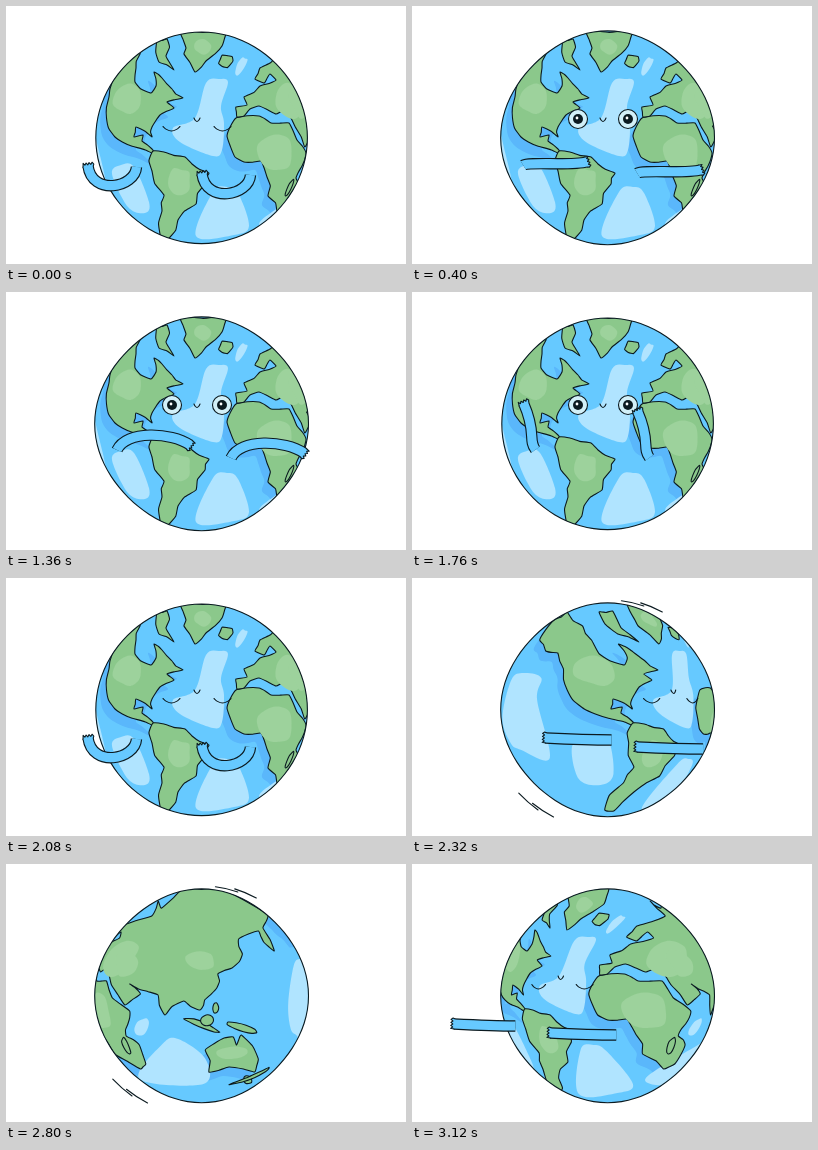
Write an HTML page with a canvas that moves like this. It is 400 px wide and 258 px high and loops after 3.2 s.

```html
<!DOCTYPE html>
<html lang="en">
<head>
<meta charset="utf-8">
<title>Dancing globe</title>
<style>
html, body { margin: 0; width: 100%; height: 100%; overflow: hidden; background: #fff; }
canvas { display: block; width: 400px; height: 258px; }
</style>
</head>
<body>
<canvas id="stage"></canvas>
<script>
const STEP = 80, FRAMES = 40, BEAT = 13, SPIN = 27;
const CX = 196, CY = 132, R = 110, TURN = 280, DEG = Math.PI / 180;
const INK = '#0b1a20', SEA = '#66c9ff', DEEP = '#5ab7fb', FOAM = '#b0e4ff',
      LAND = '#8bc88b', MEADOW = '#9dd29c';

const canvas = document.getElementById('stage');
const dpr = window.devicePixelRatio || 1;
canvas.width = 400 * dpr;
canvas.height = 258 * dpr;
const g = canvas.getContext('2d');

let seed = 7;
const random = () => (seed = (seed * 16807) % 2147483647) / 2147483647;

// Key points are given as seen with the globe turned to one of these views:
// Atlantic, Pacific, Pacific from its far side, South Asia, Africa.
const VIEW = { A: 0, P: 77, Q: -203, S: -112, F: -26 };
const ring = y => R * Math.sqrt(Math.max(0.3, 1 - ((y - CY) / R) ** 2));

function toGlobe(view, x, y) {
  const s = Math.max(-1, Math.min(1, (x - CX) / ring(y)));
  return [Math.asin(s) / DEG - VIEW[view], y];
}

function read(text) {
  let view;
  const out = [];
  for (const word of text.trim().split(/\s+/)) {
    if (word in VIEW) view = word;
    else out.push(toGlobe(view, ...word.split(',').map(Number)));
  }
  return out;
}

// Break long stretches of coast with a small random bend.
function roughen(pts) {
  return pts.flatMap((p, i) => {
    const q = pts[(i + 1) % pts.length], dx = q[0] - p[0], dy = q[1] - p[1];
    if (Math.hypot(dx, dy) < 9) return [p];
    const bend = (random() - 0.5) * 0.2;
    return [p, [(p[0] + q[0]) / 2 - dy * bend, (p[1] + q[1]) / 2 + dx * bend]];
  });
}

function blob(view, x, y, rx, ry, tilt = 0) {
  return Array.from({ length: 9 }, (_, i) => {
    const a = i * 40 * DEG, r = 0.85 + 0.3 * random(), t = tilt * DEG;
    const u = rx * r * Math.cos(a), v = ry * r * Math.sin(a);
    return toGlobe(view, x + u * Math.cos(t) - v * Math.sin(t), y + u * Math.sin(t) + v * Math.cos(t));
  });
}

const foam = [
  read('A 200,77 213,73 222,76 215,100 218,117 216,144 207,150 174,136 167,122 189,112'),
  read('A 207,186 221,181 232,187 243,220 228,229 190,230'),
  read('A 106,168 115,159 128,161 143,196 139,207 122,201'),
  read('P 145,102 165,95 192,100 190,122 198,180 160,172 142,165 130,140'),
  read('S 160,180 176,175 203,195 200,220 135,215'),
  blob('A', 235, 60, 10, 4, -62), blob('S', 139, 163, 10, 6, -60)];

const coasts = [
  // North America
  `A 134,48 130,62 129,76 145,87 150,80 148,66 156,72 166,83 177,92 161,96 168,102 154,109 146,121
   146,131 130,121 128,131 137,129 136,135 146,143
   P 283,150 262,140 242,131 224,112 216,91 204,75 188,73 172,62 173,42 190,34`,
  // Africa
  `A 230,112 253,110 265,117 283,117 291,134 300,147 296,160 290,172 291,181 279,200 271,205
   262,190 261,171 255,155 238,156 229,151 221,130`,
  // Australia
  'S 203,186 222,174 231,173 234,181 239,171 255,195 251,208 226,203 206,208',
  // Europe and Asia
  `A 231,111 230,101 241,99 238,91 254,80 270,74 264,68 258,77 249,73 254,62 268,52 F 236,37 247,44
   S 180,24 215,24 Q 164,50 136,64 128,87 124,78 S 255,67 236,75 240,90 230,104 216,110 215,124
   203,136 198,146 182,137 163,151 156,131 136,125 127,120 138,130 122,141 108,121
   A 286,114 282,104 270,108 262,104 253,100 244,103 238,110`,
  // South America
  `A 147,145 158,146 179,151 186,158 203,167 199,178 190,198 172,214 162,233 155,232 156,205
   158,189 146,165`,
  // Greenland, Baffin
  'A 174,24 180,42 178,48 189,66 200,55 216,40 220,24',
  'A 151,34 161,33 160,50 168,64 153,56'
].map(text => roughen(read(text)));
const shaded = coasts.slice(0, 3);

const islands = [
  blob('A', 220, 55, 7, 6), blob('F', 255, 182, 3.5, 9, 20), blob('S', 200, 161, 18, 3, 22),
  blob('S', 205, 156, 6, 5), blob('S', 214, 144, 3, 5), blob('S', 240, 164, 14, 3.5, 18),
  blob('S', 244, 216, 4, 4), blob('Q', 143, 212, 3, 10, 35)];

const meadows = [
  blob('A', 122, 93, 15, 15), blob('A', 174, 175, 11, 13), blob('A', 196, 40, 9, 8),
  blob('A', 268, 147, 17, 19), blob('F', 250, 95, 22, 17), blob('S', 198, 96, 15, 10),
  blob('S', 123, 98, 12, 14), blob('S', 230, 189, 15, 6)];

// Smooth line through the points; a larger ease gives a softer curve.
function trace(pts, closed, ease = 0.167) {
  const n = pts.length;
  const at = i => closed ? pts[(i + n) % n] : pts[Math.max(0, Math.min(n - 1, i))];
  g.beginPath();
  g.moveTo(...pts[0]);
  for (let i = 0; i < (closed ? n : n - 1); i++) {
    const [a, b, c, d] = [at(i - 1), at(i), at(i + 1), at(i + 2)];
    g.bezierCurveTo(b[0] + (c[0] - a[0]) * ease, b[1] + (c[1] - a[1]) * ease,
      c[0] - (d[0] - b[0]) * ease, c[1] - (d[1] - b[1]) * ease, ...c);
  }
  if (closed) g.closePath();
}

function project(pts, turn) {
  for (const k of [-TURN, 0, TURN]) {
    const at = pts.map(([lon, y]) => [lon + turn + k, y]);
    if (at.every(p => Math.abs(p[0]) >= 90)) continue;
    return at.map(([lon, y]) => [CX + ring(y) *
      (Math.abs(lon) < 90 ? Math.sin(lon * DEG) : 1.1 * Math.sign(lon)), y]);
  }
  return null;
}

function paint(list, turn, fill, inked) {
  g.fillStyle = fill;
  for (const pts of list) {
    const p = project(pts, turn);
    if (!p) continue;
    trace(p, true, inked ? 0.08 : 0.167);
    g.fill();
    if (inked) g.stroke();
  }
}

function rim(n) {
  const wobble = n % 2 ? 1.5 : 0.4;
  return Array.from({ length: 48 }, (_, i) => {
    const a = i * 7.5 * DEG, r = 105.4 + wobble * Math.cos(4 * a);
    return [195.6 + r * Math.cos(a), 131.8 + r * Math.sin(a)];
  });
}

// Arm poses: shoulder, two controls, hand
const low = [130.5, 161, 129, 182, 86, 190, 82, 160];
const over = [111, 158, 120, 138, 165, 140, 184, 153];
const reach = [133, 155, 118, 140, 100, 143, 73, 133];
const mirror = pose => pose.map((v, i) => i % 2 ? v : 242 - v);
const sway = [[0, low], [4, over], [6.5, mirror(low)], [11, reach], [13, low]];

function armPose(beat) {
  const i = sway.findIndex(([t]) => t > beat);
  const [t0, from] = sway[i - 1], [t1, to] = sway[i];
  const k = (beat - t0) / (t1 - t0);
  // The hand lifts while it passes the shoulder.
  const lift = i % 2 ? 34 * Math.sin(Math.PI * k) : 0;
  return from.map((v, j) => v + (to[j] - v) * k - (j % 2 ? lift * (j - 1) / 6 : 0));
}

function drawArm([x0, y0, x1, y1, x2, y2, x3, y3]) {
  g.lineCap = 'butt';
  for (const [width, color] of [[11.4, INK], [9.2, SEA]]) {
    g.lineWidth = width;
    g.strokeStyle = color;
    g.beginPath();
    g.moveTo(x0, y0);
    g.bezierCurveTo(x1, y1, x2, y2, x3, y3);
    g.stroke();
  }
  g.save();
  g.translate(x3, y3);
  g.rotate(Math.atan2(y3 - y2, x3 - x2));
  g.lineWidth = 1.1;
  g.strokeStyle = INK;
  g.fillStyle = SEA;
  g.beginPath();
  g.moveTo(-1, -5.1);
  for (let v = -4.5; v < 5; v += 3) {
    g.lineTo(3.2, v);
    g.lineTo(1.2, v + 1.5);
  }
  g.lineTo(-1, 5.1);
  g.fill();
  g.stroke();
  g.restore();
}

function spinArm(x, y, turn) {
  let lon = toGlobe('A', x, y)[0] + turn;
  if (lon > TURN / 2) lon -= TURN;
  if (lon < -65 || lon > 85) return;
  const sx = CX + ring(y) * Math.sin(lon * DEG), hx = Math.max(42, sx - 66);
  drawArm([sx, y, sx - 20, y, hx + 20, y - 1, hx, y - 2]);
}

const smile = (x, y, w, h) => [-1, -0.6, 0, 0.6, 1].map(u => toGlobe('A', x + u * w, y + h * (1 - u * u)));
const mouth = smile(191, 112, 3, 3.5);
const shut = [smile(165.5, 120.5, 8.5, 4.5), smile(216.5, 120.5, 8.5, 4.5)];

function drawMark(pts, turn) {
  const p = project(pts, turn);
  if (p) { trace(p, false); g.stroke(); }
}

function disc(x, y, r, fill, end = 360) {
  g.beginPath();
  g.arc(x, y, r, 0, end * DEG);
  g.closePath();
  g.fillStyle = fill;
  g.fill();
}

function openEye(x) {
  disc(x, 113, 9.5, '#d2f0f8');
  g.stroke();
  disc(x, 113, 5, INK);
  disc(x - 1, 112, 1.4, '#fff');
}

function sleepyEye(x, side) {
  disc(x, 113.5, 9, '#e2f5fa', 180);
  g.stroke();
  disc(x + side, 113.5, 5.3, INK, 180);
  g.lineWidth = 2;
  g.beginPath();
  g.moveTo(x - 10, 113.5 - side);
  g.lineTo(x + 10, 113.5 + side);
  g.stroke();
  g.lineWidth = 1.1;
}

function drawFace(beat, turn, spinning) {
  drawMark(mouth, turn);
  if (spinning || beat < 2 || beat > 11) shut.forEach(e => drawMark(e, turn));
  else if (beat < 3 || beat > 9) { sleepyEye(166, 1); sleepyEye(215, -1); }
  else { openEye(166); openEye(216); }
}

function drawWhoosh() {
  [-77, -67, 123, 131].forEach((mid, i) => {
    g.beginPath();
    g.arc(CX, CY, (i < 2 ? 110 : 120) + (i % 2) * 2, (mid - 6) * DEG, (mid + 6) * DEG);
    g.stroke();
  });
}

// Nearly steady turn with a soft start and finish
const spinTurn = u => TURN * (u - 0.025 * Math.sin(Math.PI * u));

function draw(n) {
  const spinning = n >= SPIN, beat = n % BEAT;
  const turn = spinning ? spinTurn((n - SPIN) / (FRAMES - SPIN)) : 0;
  const edge = rim(n);
  g.setTransform(dpr, 0, 0, dpr, 0, 0);
  g.fillStyle = '#fff';
  g.fillRect(0, 0, 400, 258);
  g.lineJoin = g.lineCap = 'round';
  g.strokeStyle = INK;
  g.lineWidth = 1.1;

  g.save();
  trace(edge, true);
  g.clip();
  g.fillStyle = SEA;
  g.fillRect(0, 0, 400, 258);
  g.translate(-6, 9);
  paint(shaded, turn, DEEP);
  g.translate(6, -9);
  paint(foam, turn, FOAM);
  paint(coasts, turn, LAND, true);
  paint(islands, turn, LAND, true);
  paint(meadows, turn, MEADOW);
  drawFace(beat, turn, spinning);
  g.restore();

  trace(edge, true);
  g.stroke();
  if (n === 28 || n === 29 || (n > 32 && n < 36)) drawWhoosh();

  if (spinning) {
    spinArm(131, 162, turn);
    spinArm(244, 171, turn);
  } else {
    const arm = armPose(beat);
    drawArm(arm);
    drawArm(arm.map((v, i) => v + (i % 2 ? 8 : 114)));
  }
}

const start = performance.now();
let last = -1;
function tick() {
  const n = Math.floor((performance.now() - start) / STEP) % FRAMES;
  if (n !== last) draw(last = n);
  requestAnimationFrame(tick);
}
tick();
</script>
</body>
</html>
```
